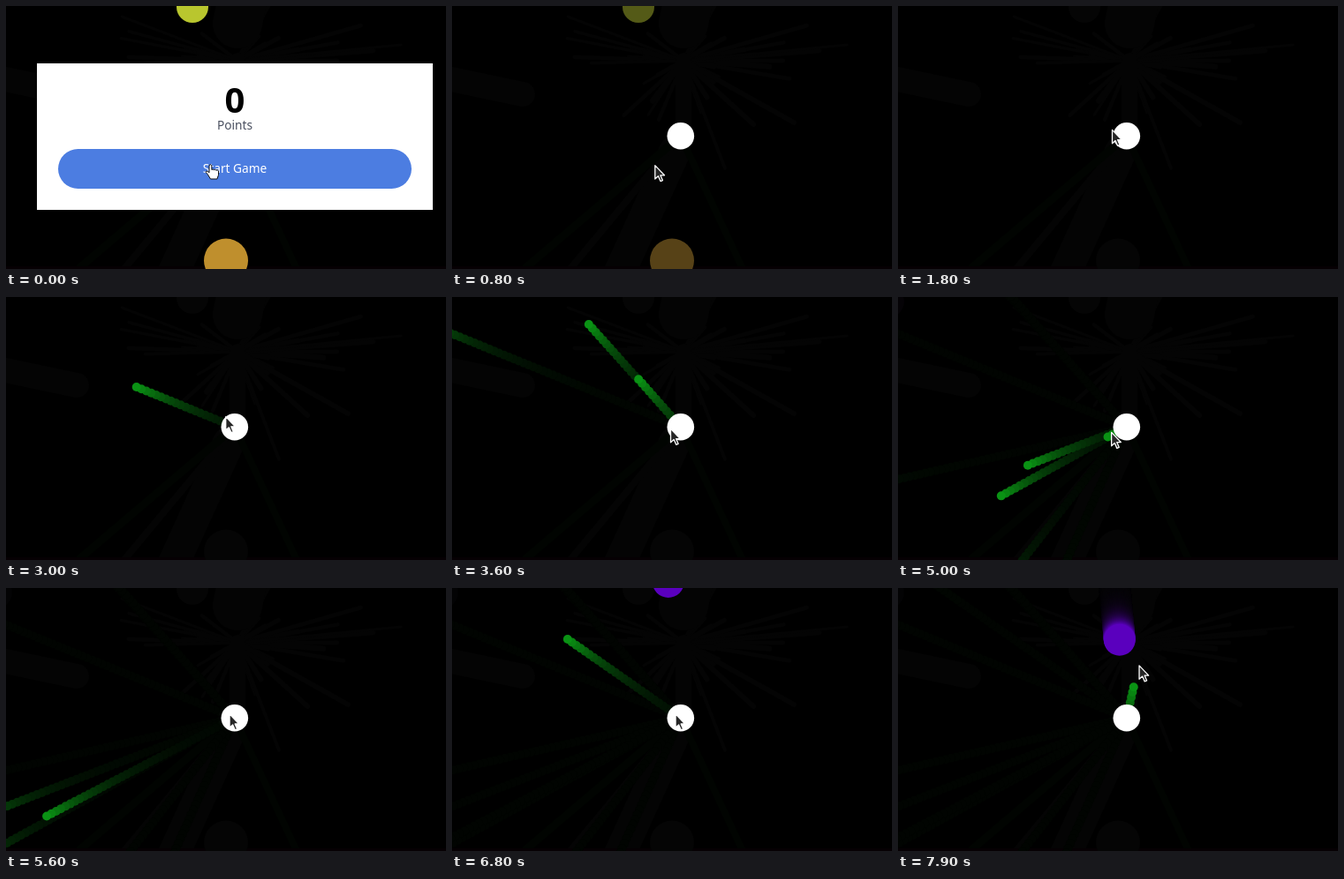
Recreate the animation shown at these times as an HTML page with a canvas. Size 498 by 298 pixels, loop 8000 ms.

```html
<!DOCTYPE html>
<html lang="en">
<head>
<meta charset="utf-8">
<title>Shooter</title>
<style>
  html, body { margin: 0; width: 100%; height: 100%; overflow: hidden; background: #000; }
  canvas, svg { position: absolute; left: 0; top: 0; width: 498px; height: 298px; display: block; }
  text { font-family: Ubuntu, "Noto Sans", "Open Sans", sans-serif; text-anchor: middle; }
</style>
</head>
<body>
<canvas id="game" width="498" height="298"></canvas>
<svg viewBox="0 0 498 298">
  <g id="modal">
    <rect x="35" y="65" width="448" height="166" fill="#fff"/>
    <text x="259" y="121" font-size="40" font-weight="700">0</text>
    <text x="259" y="140" font-size="13.7" fill="#4a5060">Points</text>
    <rect x="59" y="162" width="400" height="45" rx="22.5" fill="#4c7de1"/>
    <rect id="ring" x="58.5" y="161.5" width="401" height="46" rx="23" fill="none" stroke="#2f5bc0"/>
    <text x="259" y="189" font-size="13.7" fill="#fff">Start Game</text>
    <path fill="#fff" stroke="#111" stroke-linejoin="round"
      d="M230 180.5q1.4-1.6 2.8 0v5q1.4-1.3 2.6.2 1.4-1 2.4.4 1.6-.8 2.7.8v4.6l-1.6 4.5h-7.4l-3.2-5.2-2.1-2.4q.4-2 2.2-1l1.6 1.4z"/>
  </g>
  <path id="arrow" d="M.8 1.6V17l3.6-3.2 2.6 5.8 2.4-1L6.9 12.8h4.6z"
    fill="#262626" stroke="#fff" stroke-width="1.3" stroke-linejoin="round"/>
</svg>
<script>
const LOOP = 8000, STEP = 100, FRAME = 1000 / 60, FADE = 0.9;
const CX = 258.8, CY = 147.3, SHOT_SPEED = 6, MOVE = 500;
const GREEN = [10, 146, 20], GREEN_REST = [1, 4, 1], REST = [5, 5, 5];

const el = id => document.getElementById(id);
const ctx = el('game').getContext('2d');

// the pointer aims, and fires unless it only rests there
const aim = (time, degrees, reach, fires = true) => {
  const a = degrees * Math.PI / 180;
  return { time, reach, fires, ux: Math.cos(a), uy: Math.sin(a) };
};
const aims = [
  aim(2660, 202.2, 18.5), aim(3162, 228.2, 16), aim(3395, 228.6, 16),
  aim(3728, 167.1, 12.5), aim(3962, 114.2, 20), aim(4162, 128, 28),
  aim(4545, 151.2, 35), aim(4660, 158.8, 34), aim(4928, 152.4, 30),
  aim(5350, 214.9, 8, false), aim(6362, 214.9, 8), aim(7795, 282.7, 61)
];

const mix = (a, b, k) => `rgb(${a.map((v, i) => Math.round(v + (b[i] - v) * k))})`;
const frames = (from, to) => Math.floor((to - from) / FRAME);

function seeded(seed) {
  return () => (seed = seed * 16807 % 2147483647) / 2147483647;
}

function disc(x, y, r, color) {
  ctx.fillStyle = color;
  ctx.beginPath();
  ctx.arc(x, y, r, 0, 7);
  ctx.fill();
}

function line(x1, y1, x2, y2, width, color) {
  ctx.strokeStyle = color;
  ctx.lineWidth = width;
  ctx.beginPath();
  ctx.moveTo(x1, y1);
  ctx.lineTo(x2, y2);
  ctx.stroke();
}

// marks the fading never fully clears
function drawMarks() {
  const gray = '#040404', green = '#010401';
  const x = 262, y = 62, rnd = seeded(11);
  ctx.lineCap = 'round';
  for (let i = 0; i < 44; i++) {
    const a = rnd() * 2 * Math.PI, len = 30 + 100 * rnd() ** 2;
    line(x, y, x + len * Math.cos(a) * 1.2, y + len * Math.sin(a) * 0.7, 3 + 4 * rnd(), gray);
  }
  line(x, y, 447, 44, 3, gray);
  line(x, y, 387, 132, 6, gray);
  line(x, y, 309, 184, 4, gray);
  line(x, y, 131, 12, 3, gray);
  line(x + 6, -10, x, 20, 56, gray);
  line(x, y, x, 140, 18, gray);
  line(-10, 81, 80, 100, 28, gray);
  line(252, 165, 186, 310, 36, gray);
  line(CX, CY, 132, 300, 8, gray);
  line(CX, CY, 84, 296, 9, green);
  line(CX, CY, 330, 300, 8, green);
  ctx.fillStyle = '#060003';
  ctx.fillRect(0, 295, 498, 3);
}

function drawShot(t, { time, ux, uy }) {
  const n = frames(time, t);
  for (let k = 0; k <= n; k++) {
    const x = CX + ux * k * SHOT_SPEED, y = CY + uy * k * SHOT_SPEED;
    if (x < -5 || y < -5 || y > 303) break;
    disc(x, y, 5, mix(GREEN_REST, GREEN, FADE ** (n - k)));
  }
}

// an enemy drifts one pixel per frame toward the player until `end`
function drawEnemy(t, start, end, x, y, color) {
  const n = frames(start, t), last = Math.min(n, frames(start, end));
  const d = Math.hypot(CX - x, CY - y);
  for (let k = 0; k <= last; k++) {
    disc(x + (CX - x) / d * k, y + (CY - y) / d * k, 18, mix([3, 3, 4], color, FADE ** (n - k)));
  }
}

const spot = a => [CX + a.ux * a.reach, CY + a.uy * a.reach];

function pointer(t) {
  if (t < 1800) return [229, 180.5];
  const i = aims.findIndex(a => a.time >= t);
  if (i < 1) return spot(i ? aims[aims.length - 1] : aims[0]);
  const prev = aims[i - 1], next = aims[i];
  const start = Math.max(prev.time, next.time - MOVE);
  const u = Math.max(0, (t - start) / (next.time - start));
  const k = 1 - (1 - u) ** 3;
  const to = spot(next);
  return spot(prev).map((v, j) => v + (to[j] - v) * k);
}

function render(t) {
  const menu = t < 700;
  el('modal').style.display = menu ? '' : 'none';
  el('ring').style.display = t >= 500 ? '' : 'none';
  el('arrow').style.display = menu ? 'none' : '';

  ctx.fillStyle = '#000';
  ctx.fillRect(0, 0, 498, 298);
  drawMarks();

  const glow = menu ? 1 : FADE ** ((t - 670) / FRAME);
  disc(211, 1, 18, mix(REST, [185, 198, 46], glow));
  disc(249, 288.5, 25, mix(REST, [191, 143, 45], glow));

  drawEnemy(t, 4150, 4310, -19, 1, [150, 0, 160]);
  for (const a of aims) if (a.fires) drawShot(t, a);
  drawEnemy(t, 6615, LOOP, 243.8, -18, [90, 0, 190]);
  disc(CX, CY, 15.3, '#fff');

  const [x, y] = pointer(t);
  el('arrow').setAttribute('transform', `translate(${x} ${y - 1.5})`);
}

const begin = performance.now();
function tick() {
  const t = (performance.now() - begin) % LOOP;
  render(Math.floor(t / STEP) * STEP);
  requestAnimationFrame(tick);
}
tick();
</script>
</body>
</html>
```
